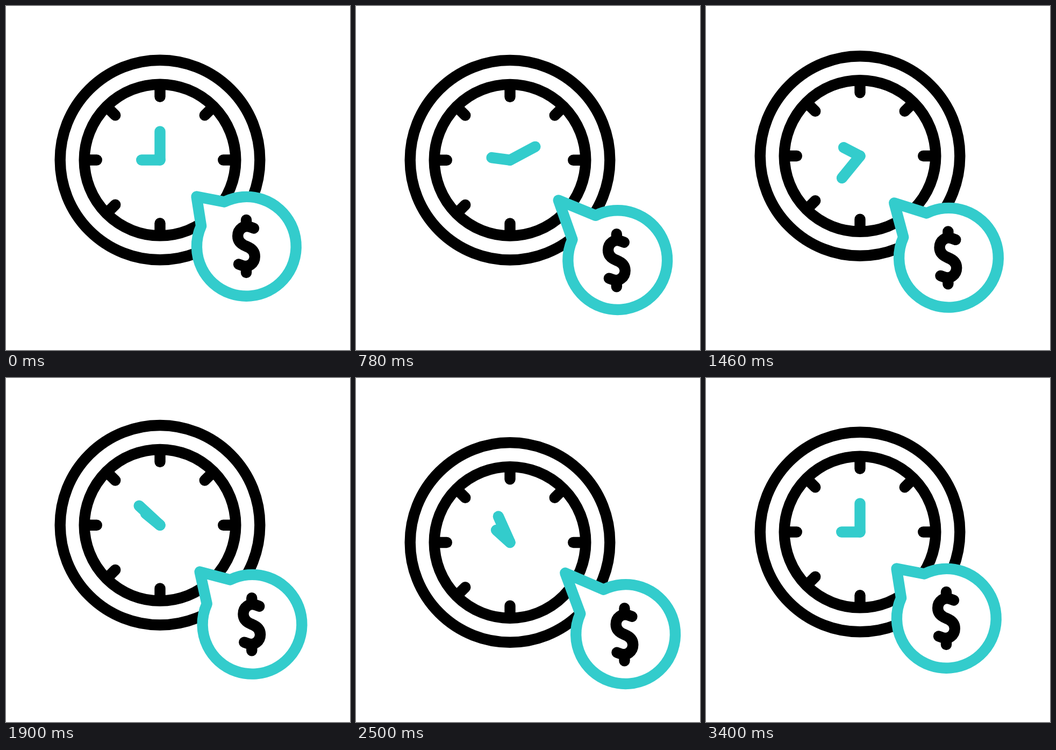
An HTML page with a canvas that plays this animation: 640x640 px, repeating every 3.6 s.

```html
<!DOCTYPE html>
<html lang="en">
<head>
<meta charset="utf-8">
<title>Time is money</title>
<style>
  html, body { margin: 0; width: 100%; height: 100%; overflow: hidden; background: #fff; }
  canvas { display: block; width: 640px; height: 640px; }
</style>
</head>
<body>
<canvas id="stage" width="640" height="640"></canvas>
<script>
const ctx = document.getElementById('stage').getContext('2d');
const LOOP = 3600;
const BLACK = '#000', TEAL = '#33cccc';
const START = 200, PEAK = 2360, REST = 2900;
const rad = Math.PI / 180;

// Half of the dollar sign; the other half is the same shape turned around.
const dollarHalf = new Path2D('M14 -33.5 L7 -36 C-4 -40 -15.8 -32 -15.8 -19 C-15.8 -9 -9 -3.5 0 0 M0 -49 V-38');

// Eased progress from 0 to 1 between two times.
function ease(t, from, to) {
  const u = Math.min(1, Math.max(0, (t - from) / (to - from)));
  return u * u * (3 - 2 * u);
}

// Rises from 0 to 1 and falls back to 0.
const bump = (t, from, top, to) => ease(t, from, top) - ease(t, top, to);

// The clock swings up and down by turns.
function bobAt(t) {
  const turns = [START, 600, 960, 1320, 1680, 2000, PEAK, REST];
  let y = 0;
  for (let i = 0; i + 2 < turns.length; i++) {
    y += (i % 2 ? 1 : -1) * bump(t, turns[i], turns[i + 1], turns[i + 2]);
  }
  return 23.4 * y;
}

const spinAt = t => 360 * bump(t, START, 2400, 3040);
const stretchAt = t => 24 * (bump(t, START, 1080, 1720) + bump(t, 1720, PEAK, REST));

// The bubble wanders along three curves, then returns in a straight line.
function driftAt(t) {
  const home = [0, 0], right = [38.5, 46], left = [-11.6, 21.5], far = [65.3, 35.2];
  const curve = (from, to, a, bend, b) => {
    const s = ease(t, from, to);
    return a.map((v, i) => (1 - s) ** 2 * v + 2 * s * (1 - s) * bend[i] + s * s * b[i]);
  };
  if (t < 960) return curve(START, 960, home, [45.5, -36], right);
  if (t < 1680) return curve(960, 1680, right, [27, 16.4], left);
  if (t < PEAK) return curve(1680, PEAK, left, [35.4, -9], far);
  return far.map(v => v * (1 - ease(t, PEAK, REST)));
}

function ring(r) {
  ctx.beginPath();
  ctx.arc(0, 0, r, 0, 2 * Math.PI);
  ctx.stroke();
}

// Radial line; the angle runs clockwise from twelve o'clock.
function spoke(deg, from, to) {
  const x = Math.sin(deg * rad), y = -Math.cos(deg * rad);
  ctx.beginPath();
  ctx.moveTo(x * from, y * from);
  ctx.lineTo(x * to, y * to);
  ctx.stroke();
}

function drawClock(y, angle) {
  ctx.save();
  ctx.translate(286.5, 286.5 + y);
  ctx.strokeStyle = BLACK;
  ring(185.8);
  ring(140.8);
  // The lower right has no tick.
  for (let deg = 180; deg < 495; deg += 45) spoke(deg, 117.7, 138);
  ctx.strokeStyle = TEAL;
  spoke(angle, 0, 53);
  spoke(270 + angle / 8, 0, 34.3);
  ctx.restore();
}

function drawBubble([x, y], stretch) {
  ctx.save();
  ctx.translate(447.3 + x, 447.3 + y);
  ctx.beginPath();
  ctx.moveTo(-92.8 - stretch * 0.98, -92.8 - stretch * 1.05);
  ctx.arc(0, 0, 92.4, -116.3 * rad, 204.3 * rad);
  ctx.closePath();
  ctx.fillStyle = '#fff';
  ctx.fill();
  ctx.strokeStyle = TEAL;
  ctx.stroke();

  ctx.translate(-0.3 - stretch * 0.09, -0.3 + stretch * 0.05);
  ctx.strokeStyle = BLACK;
  ctx.stroke(dollarHalf);
  ctx.rotate(Math.PI);
  ctx.stroke(dollarHalf);
  ctx.restore();
}

function draw() {
  const t = performance.now() % LOOP;
  ctx.fillStyle = '#fff';
  ctx.fillRect(0, 0, 640, 640);
  ctx.lineWidth = 20.4;
  ctx.lineCap = ctx.lineJoin = 'round';
  drawClock(bobAt(t), spinAt(t));
  drawBubble(driftAt(t), stretchAt(t));
  requestAnimationFrame(draw);
}
draw();
</script>
</body>
</html>
```
